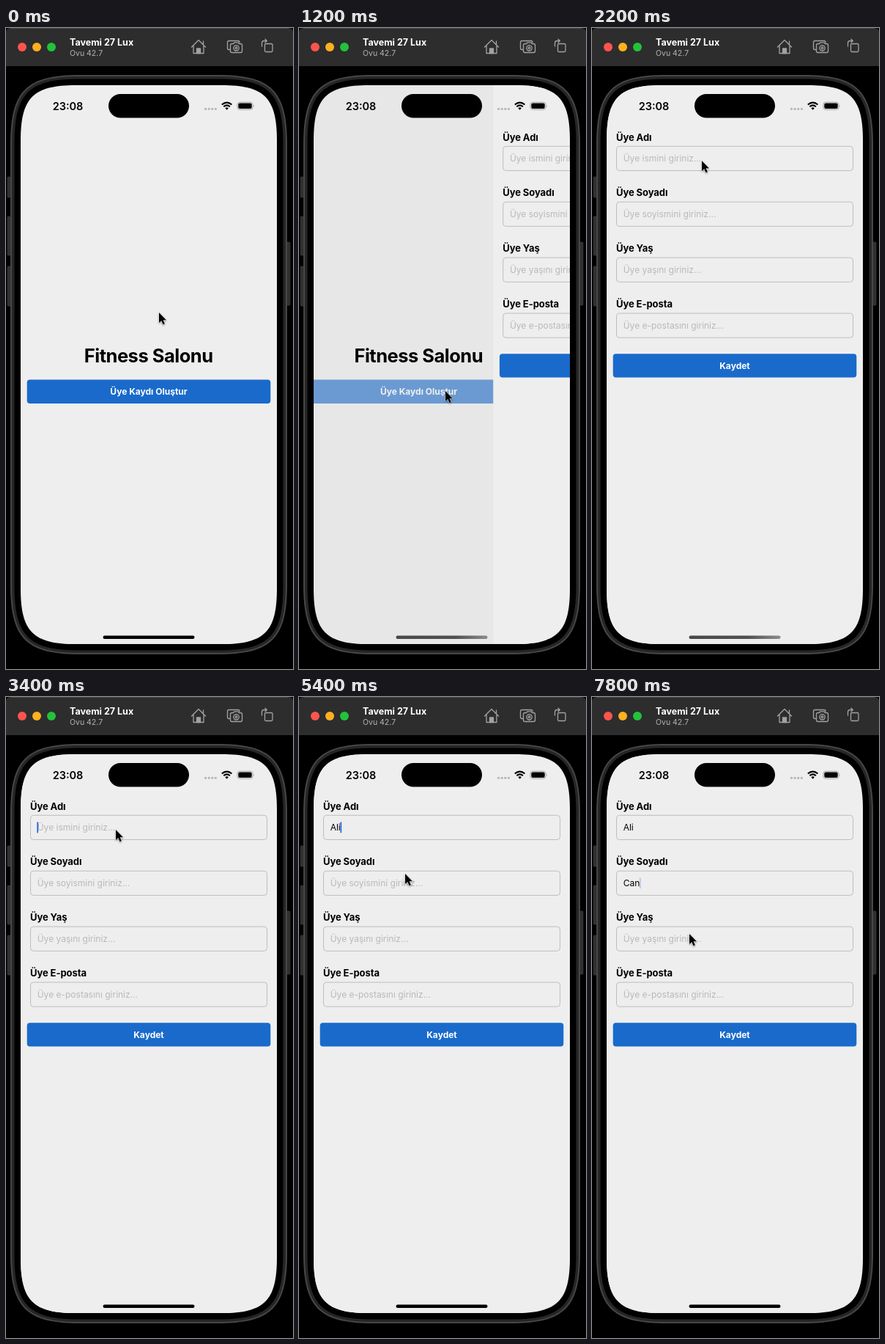
Write an HTML page that moves like this. It is 392x874 px and loops after 8 s.

```html
<!DOCTYPE html>
<html lang="tr">
<head>
<meta charset="utf-8">
<title>Üye Kaydı</title>
<style>
  html, body { margin: 0; width: 100%; height: 100%; overflow: hidden; background: #000; }
  svg { display: block; width: 392px; height: 874px; font-family: Inter, Roboto, sans-serif; }
  .device { font-size: 12.5px; font-weight: 700; fill: #fff; }
  .system { font-size: 10.5px; fill: #b4b4b4; }
  .icon { fill: none; stroke: #a2a2a2; stroke-width: 1.3; stroke-linejoin: round; stroke-linecap: round; }
  .clock { font-size: 14.5px; font-weight: 600; text-anchor: middle; }
  .title { font-size: 25.5px; font-weight: 700; letter-spacing: -.5px; text-anchor: middle; }
  .label { font-size: 13px; font-weight: 700; letter-spacing: -.08px; }
  .value { font-size: 12px; }
  .hint { fill: #b9b9b9; }
  .field { fill: none; stroke: #bdbdbd; }
  .button rect { fill: #196acb; }
  .button text { font-size: 12px; font-weight: 700; fill: #fff; text-anchor: middle; }
  .page { fill: #eee; }
</style>
</head>
<body>
<svg viewBox="0 0 392 874">
  <defs>
    <clipPath id="screen"><path data-box="20 78 350 762 54"/></clipPath>
    <linearGradient id="fade">
      <stop offset="0" stop-color="#484848"/>
      <stop offset=".65" stop-color="#505050"/>
      <stop offset="1" stop-color="#8c8c8c"/>
    </linearGradient>
  </defs>
  <rect width="392" height="874"/>

  <!-- window bar -->
  <path d="M0 52V6Q0 0 6 0H386Q392 0 392 6V52Z" fill="#2d2d2d"/>
  <path d="M6 .5H386" stroke="#484848"/>
  <circle cx="22" cy="26" r="6" fill="#ff544d"/>
  <circle cx="42" cy="26" r="6" fill="#ffb01f"/>
  <circle cx="62" cy="26" r="6" fill="#22c33b"/>
  <text class="device" x="87" y="24">Tavemi 27 Lux</text>
  <text class="system" x="87" y="38">Ovu 42.7</text>
  <g class="icon">
    <path d="M253.5 26L263 16.5L272.5 26M256 24V34.5H270V24M269.5 22.5V18"/>
    <path d="M260.5 34.5V28H265.5V34.5Z" fill="#a2a2a2"/>
    <path d="M306 29.5H304.5Q302.5 29.5 302.5 27.5V19.5Q302.5 17.5 304.5 17.5H317Q319 17.5 319 19.5"/>
    <path d="M308.5 21.5H310.5L312 19.8H317L318.500 21.500H320.500Q322.500 21.500 322.500 23.500V31.500Q322.500 33.500 320.500 33.500H308.500Q306.500 33.500 306.500 31.500V23.500Q306.500 21.500 308.500 21.500Z" fill="#2d2d2d"/>
    <circle cx="314.500" cy="27.300" r="3.700"/>
    <circle cx="314.500" cy="27.300" r="1.300"/>
    <rect x="353.500" y="21.500" width="10.500" height="11" rx="1.500"/>
    <path d="M349.500 25V20.500Q349.500 17.500 352.500 17.500H356M354 15.300L356.300 17.500L354 19.700"/>
  </g>

  <!-- phone body -->
  <g fill="#303030" stroke="#414141" stroke-width=".6">
    <rect x="2" y="203" width="5" height="28" rx="1"/>
    <rect x="2" y="257" width="5" height="53" rx="1"/>
    <rect x="2" y="325" width="5" height="54" rx="1"/>
    <rect x="383" y="292" width="5" height="86" rx="1"/>
  </g>
  <path data-box="6 64 378 790 68" fill="#474747"/>
  <path data-box="8 66 374 786 66" fill="#262626"/>
  <path data-box="11.500 69.500 367 779 62.500"/>

  <g clip-path="url(#screen)">
    <g id="home">
      <rect class="page" x="20" y="78" width="350" height="762"/>
      <text class="title" x="194.700" y="455.500">Fitness Salonu</text>
      <g class="button" id="create">
        <rect x="28.700" y="479.500" width="332.600" height="32.500" rx="4"/>
        <text x="195" y="500">Üye Kaydı Oluştur</text>
      </g>
    </g>
    <rect id="dim" x="20" y="78" width="350" height="762"/>
    <g id="form">
      <rect class="page" x="20" y="78" width="350" height="762"/>
      <g id="fields"></g>
      <rect id="caret" width="1.800" height="15" rx=".9" fill="#2b6ad6"/>
      <g class="button">
        <rect x="28.700" y="444.200" width="332.600" height="32.300" rx="4"/>
        <text x="195" y="464.800">Kaydet</text>
      </g>
    </g>
  </g>

  <!-- status bar -->
  <text class="clock" x="84.500" y="111.700">23:08</text>
  <rect x="140" y="90" width="110" height="32.500" rx="16.250"/>
  <g fill="#b5b5b5">
    <circle cx="272.500" cy="110.300" r="1.600"/>
    <circle cx="277.200" cy="110.300" r="1.600"/>
    <circle cx="281.800" cy="110.300" r="1.600"/>
    <circle cx="286.400" cy="110.300" r="1.600"/>
  </g>
  <g fill="none" stroke="#000" stroke-width="2">
    <path d="M294.800 104.600Q301.600 98.600 308.400 104.600"/>
    <path d="M297.300 107.300Q301.600 103.500 305.900 107.300"/>
  </g>
  <path d="M299.300 109.200Q301.600 107.300 303.900 109.200L301.600 111.700Z"/>
  <rect x="315.900" y="101.200" width="21.200" height="10.200" rx="3.300" fill="none" stroke="#a0a0a0" stroke-width=".9"/>
  <rect x="317.300" y="102.600" width="18.400" height="7.400" rx="2"/>
  <path d="M338.300 104.700Q340 106.300 338.300 107.900Z" fill="#a0a0a0"/>
  <rect id="indicator" x="132.500" y="828.500" width="125" height="4.500" rx="2.250"/>

  <path id="pointer" d="M0 0V14L3.200 11L5.500 16.300L7.900 15.200L5.600 10.200H10Z"
        stroke="#fff" stroke-width="1" paint-order="stroke" style="filter: drop-shadow(0 1px 1px #0006)"/>
</svg>

<script>
  const LOOP = 8000, STEP = 200, LEAD = 20; // LEAD offsets display latency
  const FIELD_GAP = 75.9;
  const $ = id => document.getElementById(id);
  const clamp = v => Math.min(1, Math.max(0, v));
  const smooth = v => v * v * (3 - 2 * v);

  // Rounded box whose corners ease into the straight sides
  function softBox(x, y, w, h, r) {
    const e = 1.4 * r, c = 0.315 * r, R = x + w, B = y + h;
    return `M${x} ${y + e}C${x} ${y + c} ${x + c} ${y} ${x + e} ${y}H${R - e}` +
      `C${R - c} ${y} ${R} ${y + c} ${R} ${y + e}V${B - e}` +
      `C${R} ${B - c} ${R - c} ${B} ${R - e} ${B}H${x + e}` +
      `C${x + c} ${B} ${x} ${B - c} ${x} ${B - e}Z`;
  }
  document.querySelectorAll('[data-box]').forEach(p =>
    p.setAttribute('d', softBox(...p.dataset.box.split(' ').map(Number))));

  const fields = [
    ['Üye Adı', 'Üye ismini giriniz...'],
    ['Üye Soyadı', 'Üye soyismini giriniz...'],
    ['Üye Yaş', 'Üye yaşını giriniz...'],
    ['Üye E-posta', 'Üye e-postasını giriniz...']
  ];
  $('fields').innerHTML = fields.map(([label], i) => `
    <g transform="translate(0 ${i * FIELD_GAP})">
      <text class="label" x="33" y="153.500">${label}</text>
      <rect class="field" x="33.500" y="161.300" width="323" height="33.200" rx="4"/>
      <text class="value" x="42.700" y="182.200"></text>
    </g>`).join('');
  const values = document.querySelectorAll('.value');

  const entries = [
    { text: 'Ali', focus: 2400, keys: [4000, 4200, 4400] },
    { text: 'Can', focus: 5800, keys: [6800, 7000, 7200] }
  ];

  const start = [209, 388];
  const moves = [
    { from: 0, to: 800, at: [200, 495] },
    { from: 1400, to: 2200, at: [150, 181] },
    { from: 4800, to: 5400, at: [145, 241] },
    { from: 7200, to: 7800, at: [133, 323] }
  ];

  function pointerAt(t) {
    return moves.reduce(([x, y], { from, to, at }) => {
      const k = smooth(clamp((t - from) / (to - from)));
      return [x + (at[0] - x) * k, y + (at[1] - y) * k];
    }, start);
  }

  function push(t) {
    const s = Math.max(0, t - 1140) * 0.01826;
    return 1 - (1 + s) * Math.exp(-s);
  }

  function blink(age) {
    const p = age % 1000;
    return p < 500 ? 1 : p < 750 ? 1 - (p - 500) / 140 : (p - 750) / 50;
  }

  function drawFields(t) {
    const caret = $('caret');
    caret.setAttribute('opacity', 0);
    fields.forEach(([, hint], i) => {
      const entry = entries[i];
      const keys = entry ? entry.keys.filter(k => k <= t) : [];
      const typed = entry ? entry.text.slice(0, keys.length) : '';
      values[i].textContent = typed || hint;
      values[i].classList.toggle('hint', !typed);
      if (!entry || t < entry.focus) return;
      const width = typed ? values[i].getComputedTextLength() : 0;
      const last = keys.length ? keys[keys.length - 1] : entry.focus;
      caret.setAttribute('x', 42.3 + width);
      caret.setAttribute('y', 170.3 + i * FIELD_GAP);
      caret.setAttribute('opacity', clamp(blink(t - last)));
    });
  }

  function draw(t) {
    const p = push(t);
    $('home').setAttribute('transform', `translate(${-105 * p})`);
    $('dim').setAttribute('opacity', 0.1 * p);
    $('form').setAttribute('transform', `translate(${350 * (1 - p)})`);
    const pressed = clamp((t - 830) / 150) - clamp((t - 1080) / 250);
    $('create').setAttribute('opacity', 1 - 0.78 * pressed);
    $('indicator').setAttribute('fill', t >= 1200 && t < 2400 ? 'url(#fade)' : '#000');
    $('pointer').setAttribute('transform', `translate(${pointerAt(t)})`);
    drawFields(t);
  }

  function tick(now) {
    draw(Math.floor((now + LEAD) / STEP) * STEP % LOOP);
    requestAnimationFrame(tick);
  }
  draw(0);
  requestAnimationFrame(tick);
</script>
</body>
</html>
```
